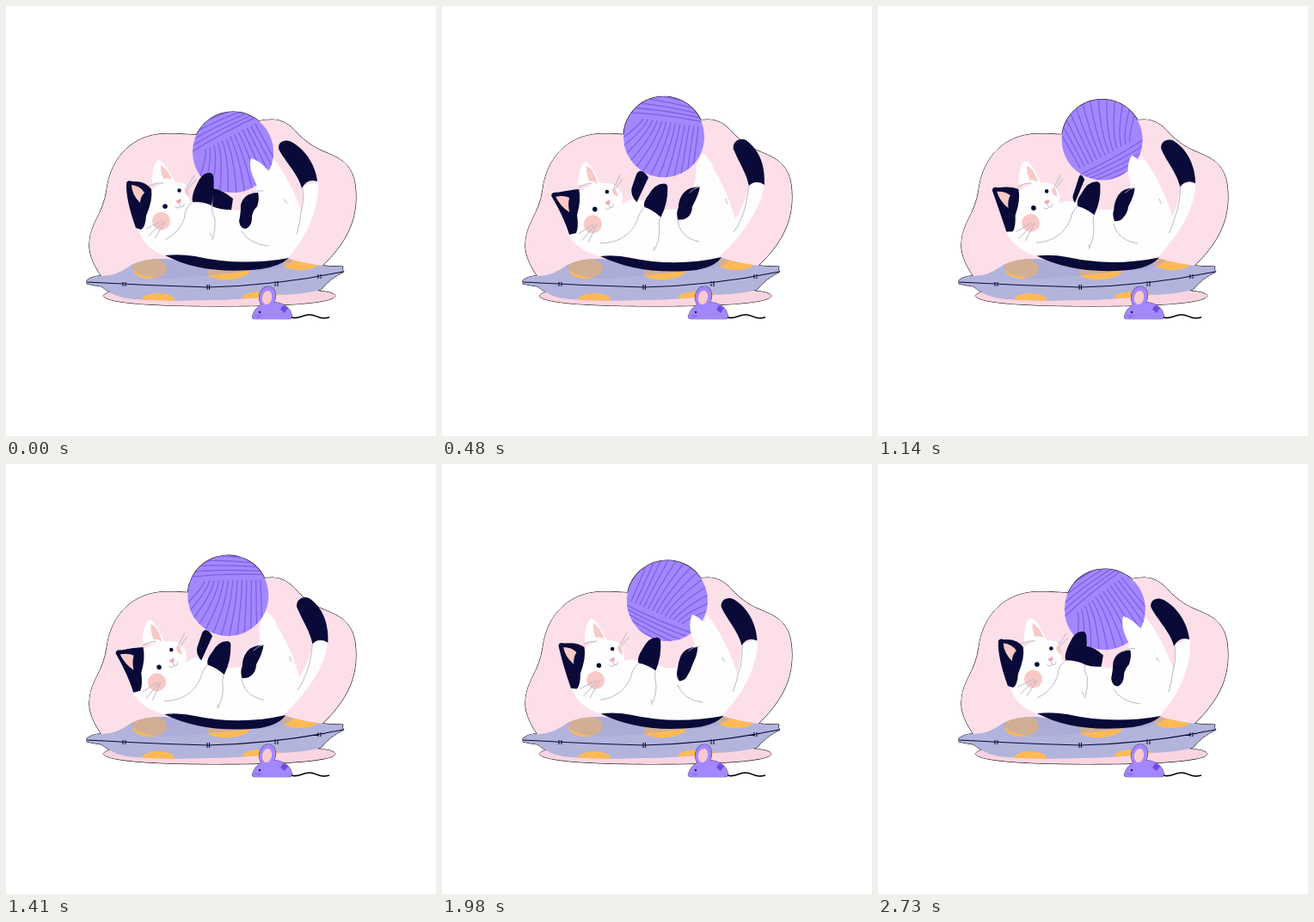
An HTML page that plays this animation: 500 by 500 pixels, repeating every 2.76 s.

```html
<!DOCTYPE html>
<html lang="en">
<head>
<meta charset="utf-8">
<title>Cat with yarn</title>
<style>
html, body { margin: 0; width: 100%; height: 100%; overflow: hidden; background: #fff; }
svg { display: block; width: 100vw; height: 100vh; }
.line { fill: none; stroke: #b5b2c4; stroke-width: .9; stroke-linecap: round; }
.ink { fill: none; stroke: #090a38; stroke-width: 1.1; }
.fringe { stroke: #000; stroke-width: 1; }
</style>
</head>
<body>
<svg viewBox="0 0 500 500">
  <defs>
    <path id="blob" d="M97 276C98 252 113 242 117 214C122 174 149 149 186 148.500C206 148 218 151 236 149C268 145 285 132 310 132C331 133 336 148 350 158C362 168 377 171 388 178C402 187 407 201 407 222C407 258 389 282 364 306L340 325H118C105 306 96 292 97 276Z"/>
    <path id="shade" d="M113 337C118 329 150 329 250 329S380 330 383 337C380 346 320 349 248 349S118 346 113 337Z"/>
    <path id="cushion" d="M94 319Q102 313 112 314Q128 314 146 301Q161 293 186 294Q255 306 325 293Q356 303 392 303Q390 307 393 309Q376 317 366 330Q348 335 318 336Q275 342 232 342Q190 344 150 341Q127 340 111 326Q103 325 94 323Z"/>
    <path id="mouse" d="M286 361Q291 345 309 344Q330 345 333 361Q333 364 328 364H290Q286 364 286 361Z"/>
    <ellipse id="mouseEar" cx="304" cy="338" rx="9.700" ry="12.200" transform="rotate(12 304 338)"/>
    <circle id="disc" r="47"/>
    <clipPath id="round"><use href="#disc"/></clipPath>
    <clipPath id="pillow"><use href="#cushion"/></clipPath>
  </defs>

  <g class="fringe">
    <use href="#blob"/><use href="#shade"/><use href="#cushion"/>
    <use href="#disc" class="ball"/>
  </g>
  <use href="#blob" fill="#fddfea"/>
  <use href="#shade" fill="#fad5e1"/>
  <use href="#cushion" fill="#b2b4dc"/>
  <g clip-path="url(#pillow)">
    <g fill="#ffba55">
      <ellipse cx="167" cy="305" rx="20" ry="12"/>
      <ellipse cx="259" cy="309" rx="25" ry="9" transform="rotate(-4 259 309)"/>
      <ellipse cx="342" cy="299" rx="21" ry="8"/>
      <ellipse cx="177" cy="342" rx="19" ry="8"/>
      <ellipse cx="298" cy="339" rx="23" ry="7"/>
    </g>
    <path d="M140 290H337Q333 308 285 308Q245 313 205 316Q160 320 147 306Z" fill="#a5a6d4" opacity=".5"/>
  </g>
  <path class="ink" d="M94 321Q165 325 235 327Q315 325 392 309M136 321v5m3-5v5M234 324v6m2.500-6v6M313 320v6m3-6v6M363 312v5m3-5v5"/>

  <g id="back"></g>
  <g class="ball">
    <use href="#disc" fill="#a387fe"/>
    <g id="yarn" clip-path="url(#round)" fill="none" stroke="#7f5eea" stroke-width="1.300"></g>
  </g>
  <g id="front"></g>
  <g id="face">
    <circle cx="180.500" cy="250" r="10.500" fill="#f9c9c6"/>
    <path d="M208 211Q214 212 213 222Q206 218 208 211Z" fill="#f9c9c6"/>
    <path class="line" d="M181 250L163 259M183 251L166 267M185 251L173 270M210 211L219 197M211 213L221 202"/>
    <path d="M197 227L203 224Q205 228 201 230Z" fill="#f5a9b4"/>
    <path class="line" d="M201 230L203 233Q199 237 197 233M203 233Q207 235 207 230"/>
    <ellipse class="eye" cx="185" cy="233" rx="2.800" ry="2.800" fill="#090a38"/>
    <ellipse class="eye" cx="201.500" cy="214.500" rx="2.300" ry="2.300" fill="#090a38"/>
  </g>

  <g class="fringe" stroke-opacity=".4"><use href="#mouse"/><use href="#mouseEar"/></g>
  <use href="#mouse" fill="#a387fe"/>
  <use href="#mouseEar" fill="#a387fe"/>
  <ellipse cx="303.500" cy="339" rx="5.600" ry="8.200" fill="#f9c9cd" transform="rotate(12 303.500 339)"/>
  <path d="M322 348L328 351L324 357L319 353Z" fill="#7048e8"/>
  <circle cx="295" cy="356" r="1.200" fill="#090a38"/>
  <path d="M289 360h7M291 363l6-3" stroke="#7b59e6" stroke-width=".7"/>
  <path d="M332 362C341 365 345 358 354 359S364 365 376 362" fill="none" stroke="#000" stroke-width="1.600"/>
</svg>
<script>
const LOOP = 2760, CYCLE = 900, PEAK = 425;
const WHITE = '#fefefe', INK = '#090a38', PINK = '#f9c9c6';
const $ = s => document.querySelector(s);
const all = s => [...document.querySelectorAll(s)];

function addPath(parent, attrs) {
  const el = document.createElementNS('http://www.w3.org/2000/svg', 'path');
  for (const k in attrs) el.setAttribute(k, attrs[k]);
  return parent.appendChild(el);
}

// Each moving part: lying pose, reaching pose, fill (none means a contour line).
const backParts = [
  ['M152 255C156 205 190 200 208 207Q214 214 213 227L218 229L240 231L262 237L272 238Q276 222 293 213L311 177Q331 203 344 240Q346 225 344 210L363 203Q365 250 327 294Q250 314 188 291Q160 284 152 255Z',
   'M145 262C140 210 180 203 199 207Q213 215 209 231L219 225L238 226L255 237L274 236Q276 226 292 212L303 172Q327 200 341 248Q355 225 357 207L375 205Q371 246 322 292Q250 312 186 292Q152 282 145 262Z', WHITE],
  ['M317 166C316 158 324 154 332 158C350 168 360 187 362 204Q350 200 344 212C340 195 322 178 317 166Z',
   'M339 166C338 156 349 152 355 157C372 170 376 190 375 208Q365 201 357 209C354 194 346 183 339 166Z', INK],
  ['M185 290Q202 288 220 291Q272 303 329 293Q318 303 296 306C250 311 214 305 185 290Z',
   'M184 291Q202 289 220 293Q272 304 325 292Q318 303 296 307C250 312 214 305 184 291Z', INK],
  ['M345 212Q347 227 343 240Q342 252 338 265', 'M357 209Q354 235 348 247Q344 257 339 263'],
  ['M274 262Q283 277 305 279', 'M274 247Q275 269 299 274'],
  ['M324 225l1 3l2 1', 'M330 224l1 4l1 2']
];
const legParts = [
  ['M285 177Q294 179 306 192L317 230L280 250L281 224Q291 217 292 209Q281 188 285 177Z',
   'M303 171Q308 174 314 183L324 230L283 240L288 222Q301 213 298 209Q290 190 303 171Z', WHITE]
];
const pawParts = [
  ['M293 217Q277 217 273 231Q273 242 271 250Q272 259 279 259Q286 256 286 246Q286 239 292 233Q295 224 293 217Z',
   'M300 210Q287 210 281 217Q275 224 275 234Q272 239 274 248Q281 249 285 246Q291 242 291 233Q299 219 300 210Z', INK],
  ['M285 218Q290 214 299 215', 'M288 217Q292 212 299 210'],
  ['M241 212Q252 214 264 224L262 237Q249 237 240 233Z',
   'M240 199Q231 186 225 194Q219 211 218 220Q226 228 237 225Z', INK],
  ['M237 194Q228 193 222 207Q215 221 217 228Q228 227 239 232Q243 214 241 198Q240 194 237 194Z',
   'M259 207Q248 207 241 220Q234 228 236 234Q245 237 255 246Q264 229 263 210Q262 207 259 207Z', INK],
  ['M217 228Q207 236 208 245Q203 263 185 272', 'M236 234Q230 240 228 249Q216 276 184 276'],
  ['M239 232Q239 241 243 248Q244 260 240 272', 'M254 246Q252 253 253 262Q253 276 246 285'],
  ['M237 264l2 4', 'M247 281l1 3']
];
const headParts = [
  ['M170 207Q170 181 178 179Q187 184 197 206Z', 'M158 208Q159 184 167 181Q175 185 184 208Z', WHITE],
  ['M180 185Q188 190 193 202Q188 199 183 201Q179 192 180 185Z',
   'M168 186Q176 189 181 207Q176 203 171 204Q167 194 168 186Z', PINK],
  ['M140 206Q141 202 147 204Q162 203 169 213Q171 225 163 244Q162 258 157 260L151 258Q139 225 140 206Z',
   'M127 221Q127 216 134 217Q149 214 159 213Q162 225 157 243Q159 258 156 264L148 266Q142 246 127 221Z', INK],
  ['M146 208Q156 209 161 217Q156 222 156 229Q146 219 146 208Z',
   'M132 222Q142 220 148 223Q146 230 148 240Q138 234 132 222Z', PINK],
  ['M167 209Q174 205 183 206', 'M159 211Q166 206 174 206']
];

const build = (parent, parts) => parts.map(([rest, reach, fill]) => ({
  el: addPath(parent, fill ? { fill } : { class: 'line' }), rest, reach
}));
const back = build($('#back'), backParts);
const leg = build($('#front'), legParts);
const paws = build($('#front'), pawParts);
const head = build($('#front'), headParts);

const yarn = $('#yarn');
for (let i = 0; i < 13; i++) {
  const x = -32 + 4.8 * i, y = -20 - .52 * x;
  addPath(yarn, { d: `M${x} ${y}Q${-30 + 6.4 * i} 8 ${-46 + 10 * i} 50` });
}
for (let i = 0; i < 5; i++)
  addPath(yarn, { d: `M-50 ${1 - 7 * i}Q-15 ${-22 - 6 * i} 34 ${-44 - 4 * i}` });

const mix = (a, b, p) => a + (b - a) * p;
const numbers = /-?\d+(\.\d+)?/g;
function morph(from, to, p) {
  const targets = to.match(numbers);
  let i = 0;
  return from.replace(numbers, n => mix(+n, +targets[i++], p).toFixed(2));
}
function pose(parts, p) {
  for (const { el, rest, reach } of parts) el.setAttribute('d', morph(rest, reach, p));
}
const swing = u => (1 - Math.cos(Math.PI * u)) / 2;
const launch = (u, sharp) => 1 - (1 - u ** 1.5) ** sharp;

function draw(now) {
  const time = now % LOOP, t = time % CYCLE;
  const p = swing(2 * t / CYCLE);
  const lift = t < PEAK ? launch(t / PEAK, 2.8) : swing((CYCLE - t) / (CYCLE - PEAK));
  const spin = -360 * launch(t / CYCLE, 4.67);

  for (const parts of [back, leg, head]) pose(parts, p);
  pose(paws, lift);
  for (const el of all('.ball'))
    el.setAttribute('transform', `translate(${mix(264, 258, p)} ${mix(170, 151.6, lift)}) rotate(${spin})`);
  $('#face').setAttribute('transform',
    `translate(${mix(0, -8.5, p)} ${mix(0, 2.5, p)}) rotate(${-7 * p} 193 224)`);

  const open = Math.min(1, Math.max(.1, Math.abs(time - 1740) / 90));
  for (const eye of all('.eye')) eye.setAttribute('ry', eye.getAttribute('rx') * open);
  requestAnimationFrame(draw);
}
draw(performance.now());
</script>
</body>
</html>
```
